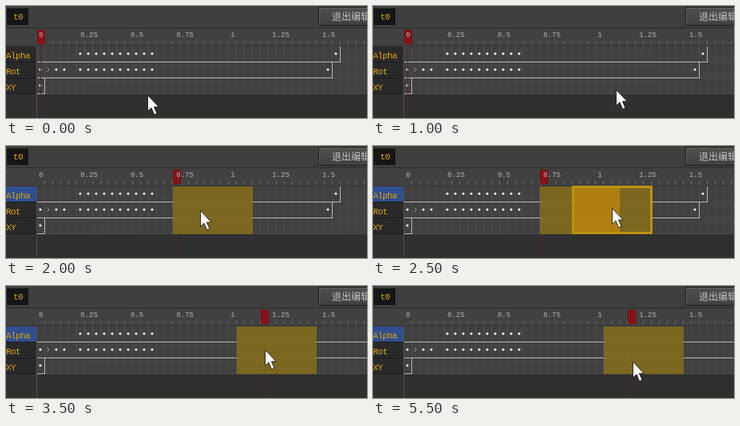
An HTML page for the animation above (6 s loop, 452x141 px).

```html
<!DOCTYPE html>
<html lang="zh">
<head>
<meta charset="utf-8">
<title>Timeline editor</title>
<style>
html, body { margin: 0; width: 100%; height: 100%; overflow: hidden; background: #303030; }
svg { display: block; width: 452px; height: 141px; }
text { white-space: pre; }
.mono { font-family: "Liberation Mono", "DejaVu Sans Mono", monospace; }
.row { font-size: 11px; letter-spacing: -.6px; fill: #e0a400; }
.tick { font-size: 9px; fill: #b4b4b4; text-anchor: middle; }
.button { font: 12px "Noto Sans CJK SC", "Noto Sans CJK", sans-serif; fill: #c4c4c4; }
.sharp { shape-rendering: crispEdges; }
</style>
</head>
<body>
<svg viewBox="0 0 452 141">
  <defs>
    <linearGradient id="face" x2="0" y2="1">
      <stop stop-color="#505050"/><stop offset="1" stop-color="#404040"/>
    </linearGradient>
  </defs>
  <g class="sharp">
    <rect width="452" height="27" fill="#3f3f3f"/>
    <rect y="27" width="452" height="1" fill="#292929"/>
    <rect y="28" width="452" height="23" fill="#414141"/>
    <rect y="50" width="452" height="1" fill="#353535"/>
    <rect x="1" y="3" width="27" height="21" fill="#161616"/>
    <rect x="391" y="1" width="70" height="24" fill="#1c1c1c"/>
    <rect x="392" y="2" width="70" height="22" fill="#606060"/>
    <rect x="393" y="3" width="70" height="21" fill="url(#face)"/>
    <rect y="51" width="38" height="60" fill="#292929"/>
    <rect x="39" y="51" width="413" height="60" fill="#414141"/>
    <path id="grid" stroke="#4c4c4c" fill="none"/>
    <path d="M0 70.5H38M0 90.5H38M0 110.5H38" stroke="#1d1d1d"/>
    <rect id="active" width="38" height="19" fill="#2f4f91"/>
    <path d="M38.5 51V141" stroke="#505050"/>
    <path id="ticks" stroke="#707070" fill="none"/>
    <path id="tracks" stroke="#b8b8b8" fill="none"/>
  </g>
  <text class="mono row" x="9" y="17">t0</text>
  <text class="button" x="408" y="18">退出编辑</text>
  <g id="names"></g>
  <g id="keys" fill="#f4f4f4"></g>
  <path d="M51.5 77.5L54.5 80L51.5 82.5" fill="none" stroke="#999"/>
  <g class="sharp">
    <g id="head">
      <rect y="30" width="10" height="18" fill="#6e1216"/>
      <rect x="1" y="31" width="8" height="17" fill="#8a1216"/>
      <path d="M4.5 48V141" stroke="#512a2c"/>
    </g>
    <rect id="selection" fill="#806a1e" fill-opacity=".93"/>
    <rect id="ghost" fill="#806a1e" fill-opacity=".93"/>
    <rect id="overlap" fill="#b28210" fill-opacity=".95"/>
    <rect id="outline" y="51.5" width="98" height="58" fill="none" stroke="#bd930e" stroke-width="3"/>
  </g>
  <g id="labels"></g>
  <path id="cursor" d="M.5 .5V20.5L5 16.3L8.6 24.8L12 23.3L8.4 15H14.2Z" fill="#fff" stroke="#1c1c1c" stroke-width=".9"/>
</svg>
<script>
const CELL = 10, LEFT = 39, TOP = 51, ROW = 20, STEP = 500;
const $ = id => document.getElementById(id);
const set = (el, attrs) => Object.entries(attrs).forEach(([k, v]) => el.setAttribute(k, v));
const add = (parent, tag, attrs, text = "") => {
  const el = document.createElementNS("http://www.w3.org/2000/svg", tag);
  set(el, attrs);
  el.textContent = text;
  $(parent).append(el);
  return el;
};
const cellX = c => LEFT + c * CELL;
const range = (a, b) => Array.from({ length: b - a + 1 }, (_, i) => a + i);
const visible = on => on ? "visible" : "hidden";

const edges = range(0, 41).map(c => cellX(c) + 9.5);
set($("grid"), { d: edges.map(x => `M${x} 51V110`).join("") + "M39 70.5H452M39 90.5H452M39 110.5H452" });
set($("ticks"), { d: edges.map(x => `M${x} 44V48`).join("") });
range(0, 6).forEach(i =>
  add("labels", "text", { class: "mono tick", x: cellX(i * 6) + 5, y: 39 }, String(i / 4)));
["Alpha", "Rot", "XY"].forEach((name, i) =>
  add("names", "text", { class: "mono row", x: 0, y: 66 + i * ROW }, name));

const dot = (cell, row) =>
  add("keys", "circle", { cx: cellX(cell) + 4, cy: 60 + row * ROW, r: 1.6 });
range(5, 14).forEach(c => { dot(c, 0); dot(c, 1); });
[0, 2, 3].forEach(c => dot(c, 1));
dot(0, 2);
const tail = [dot(37, 0), dot(36, 1)];

function box(id, from, to, row = 0) {
  set($(id), {
    x: cellX(from), y: TOP + row * ROW,
    width: Math.max(0, to - from) * CELL, height: (3 - row) * ROW,
    visibility: visible(to > from)
  });
}

// Cursor tip at each half second
const path = [[177, 112], [169, 85], [304, 105], [252, 83], [243, 81], [299, 78],
  [326, 77], [324, 80], [322, 81], [322, 81], [325, 75], [325, 95]];

function draw(step) {
  const selecting = step === 3, dropped = step >= 7;
  const head = step < 3 ? 0 : selecting ? 21 : dropped ? 28 : 17;
  const first = dropped ? 25 : selecting ? 21 : 17;
  const last = step < 3 ? first : dropped ? 35 : 27;
  const drag = step === 5 ? 21 : step === 6 ? 25 : 0;

  set($("cursor"), { transform: `translate(${path[step]})` });
  set($("head"), { transform: `translate(${cellX(head)})` });
  set($("active"), { y: selecting ? 71 : 51, visibility: visible(step >= 3) });
  box("selection", first, last, selecting ? 1 : 0);
  box("ghost", drag ? Math.max(27, drag) : 0, drag ? drag + 10 : 0);
  box("overlap", drag, drag ? 27 : 0);
  set($("outline"), { x: cellX(drag) + 1.5, visibility: visible(drag) });

  const ends = dropped ? [460, 460, 48] : [418, 408, 48];
  set($("tracks"), {
    d: ends.map((x, i) => `M39 ${70.5 + i * ROW}H${x + .5}V${TOP + i * ROW}`).join("")
  });
  tail.forEach(key => set(key, { visibility: visible(!dropped) }));
}

const start = performance.now();
let shown = -1;
function tick() {
  const step = Math.floor((performance.now() - start) / STEP) % path.length;
  if (step !== shown) draw(shown = step);
  requestAnimationFrame(tick);
}
tick();
</script>
</body>
</html>
```
